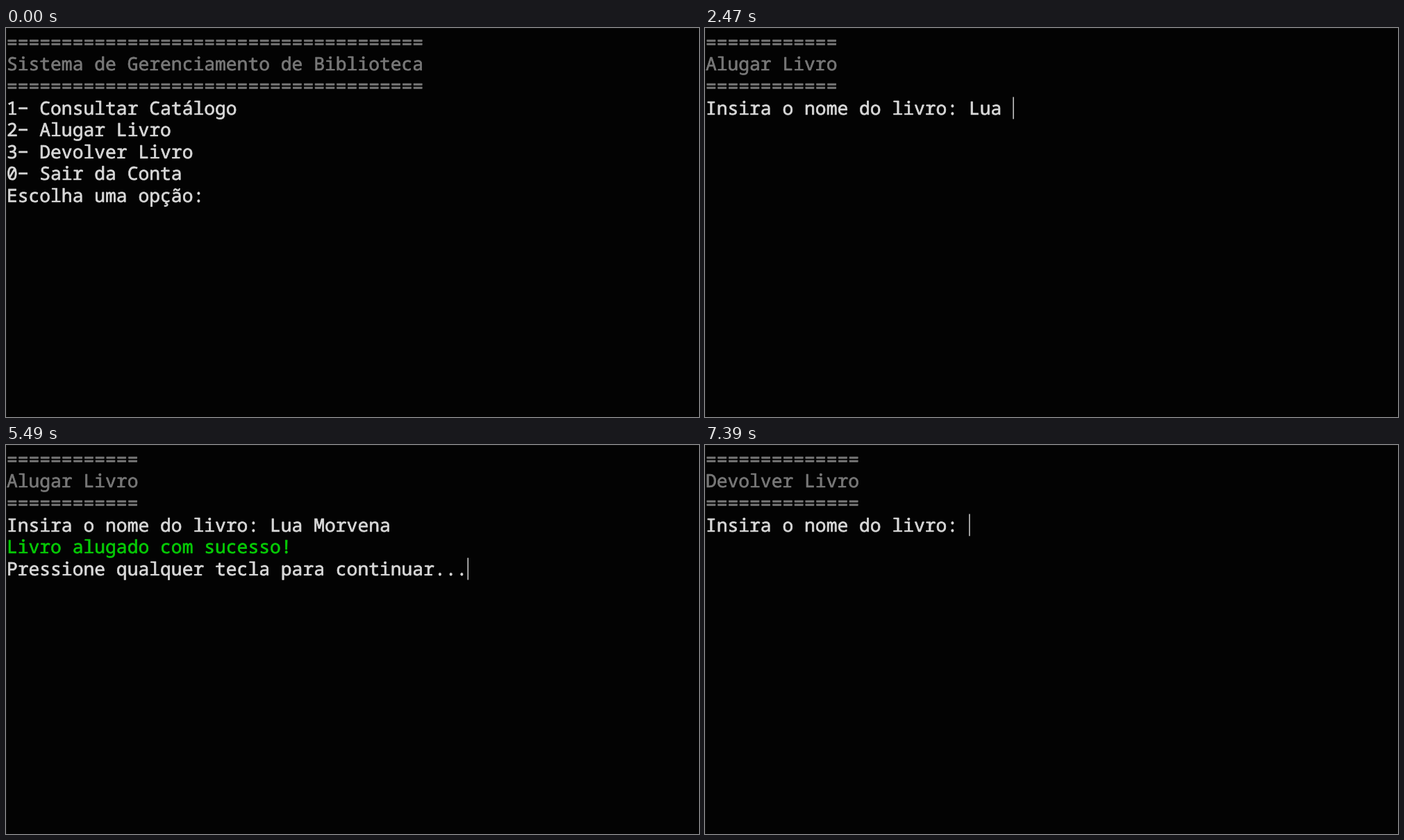
An HTML page that plays this animation: 998x561 px, repeating every 8000 ms.

```html
<!DOCTYPE html>
<html lang="pt">
<head>
<meta charset="utf-8">
<title>Biblioteca</title>
<style>
  html, body { margin: 0; width: 100%; height: 100%; overflow: hidden; background: #030303; }
  svg { display: block; width: 998px; height: 561px; }
  text {
    font: 500 26.333px "Noto Sans Mono", "DejaVu Sans Mono", monospace;
    font-variant-ligatures: none;
    text-rendering: geometricPrecision;
    white-space: pre;
    fill: currentColor;
    stroke: currentColor;
    stroke-width: 0.7px;
    stroke-linejoin: round;
  }
</style>
</head>
<body>
<svg id="stage" viewBox="0 0 998 561" xmlns="http://www.w3.org/2000/svg">
  <path d="M.5 561V.5H998" fill="none" stroke="#0d0d0d"/>
</svg>
<script>
const LOOP = 8000, CELL = 15.8, ROW = 31.6, ROWS = 8;
const WHITE = '#d9d9d9', GREY = '#787878', GREEN = '#06cb06';
const stage = document.getElementById('stage');

function add(tag, attrs) {
  const el = document.createElementNS(stage.namespaceURI, tag);
  for (const key in attrs) el.setAttribute(key, attrs[key]);
  return stage.appendChild(el);
}

const lines = Array.from({ length: ROWS }, (_, r) => add('text', { x: 0.9, y: 29.8 + r * ROW }));
const cursor = add('rect', { width: 1.4, height: 31.8, fill: '#dedede' });

// Screens are lists of [text, colour]; the cursor follows the last line.
function header(title) {
  const rule = '='.repeat(title.length);
  return [rule, title, rule].map(s => [s, GREY]);
}
const white = s => [s, WHITE];

const menu = (typed = '') => [
  ...header('Sistema de Gerenciamento de Biblioteca'),
  ...['1− Consultar Catálogo', '2− Alugar Livro', '3− Devolver Livro',
    '0− Sair da Conta', 'Escolha uma opção: ' + typed].map(white)
];
const ask = (title, typed = '') => [...header(title), white('Insira o nome do livro: ' + typed)];
const rent = typed => ask('Alugar Livro', typed);

const book = 'Lua Morvena';
const done = [
  ...rent(book),
  ['Livro alugado com sucesso!', GREEN],
  white('Pressione qualquer tecla para continuar...')
];

// Typing steps, with a lowercase slip that is erased and retyped.
const typing = [
  [1240, ''], [1920, 'L'], [2140, 'Lu'], [2320, 'Lua'], [2470, 'Lua '],
  [2670, 'Lua m'], [2740, 'Lua mo'], [3180, 'Lua m'], [3280, 'Lua '], [3370, 'Lua M'],
  ...[0, 1, 2, 3, 4].map(i => [3620 + i * 100, book.slice(0, 6 + i)]),
  [4200, book]
];

// [start ms, screen, cursor shown]
const steps = [
  [0, menu(), false],
  [550, menu(), true],
  [910, menu('2'), true],
  ...typing.map(([t, typed]) => [t, rent(typed), true]),
  [4370, done, true],
  [4920, done, false],
  [5490, done, true],
  [5800, menu(), true],
  [6360, menu(), false],
  [6940, menu(), true],
  [7080, menu('3'), true],
  [7390, ask('Devolver Livro'), true]
];

let shown = null;
function draw(time) {
  const t = time % LOOP;
  const step = steps.findLast(s => s[0] <= t);
  if (step === shown) return;
  shown = step;
  const [, screen, on] = step;
  lines.forEach((line, r) => {
    const [text, colour] = screen[r] || ['', WHITE];
    line.textContent = text;
    line.style.color = colour;
  });
  const row = screen.length - 1;
  cursor.setAttribute('x', 1 + screen[row][0].length * CELL);
  cursor.setAttribute('y', 4.7 + row * ROW);
  cursor.setAttribute('visibility', on ? 'visible' : 'hidden');
}

const start = performance.now();
function tick() {
  draw(performance.now() - start);
  requestAnimationFrame(tick);
}
tick();
</script>
</body>
</html>
```
